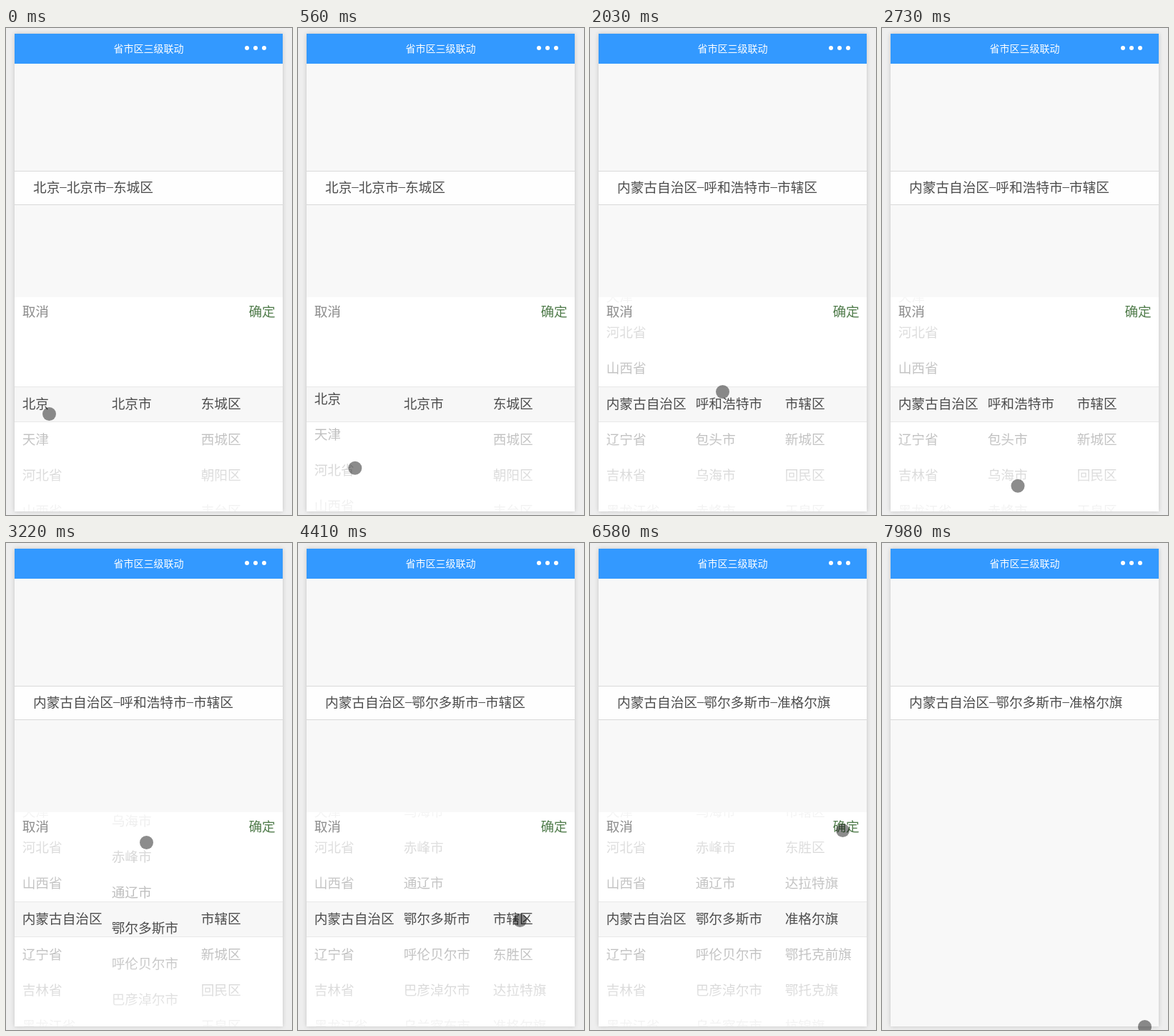
An HTML page for the animation above (8000 ms loop, 400 by 682 pixels).

```html
<!DOCTYPE html>
<html lang="zh-CN">
<head>
<meta charset="utf-8">
<style>
html, body { margin: 0; width: 100%; height: 100%; overflow: hidden; background: #eee; }
body { position: relative; font: 300 18.67px "Noto Sans CJK SC", "Noto Sans CJK", serif; color: #4c4c4c; }
div { position: absolute; box-sizing: border-box; }
#phone { left: 12px; top: 8px; width: 375px; height: 669px; background: #f8f8f8; box-shadow: 0 0 6px rgba(0,0,0,.18); }
#title { left: 0; top: 0; width: 375px; height: 42px; background: #39f; color: #fff; font-size: 14px; font-weight: 400; line-height: 40px; text-align: center; }
.dot { top: 17px; width: 6px; height: 6px; border-radius: 50%; background: #fff; }
#result { left: 0; top: 192px; width: 375px; height: 48px; padding-left: 26px; background: #fefefe; border: solid #d9d9d9; border-width: 1px 0; line-height: 42px; white-space: nowrap; }
#result i { position: relative; top: -2px; font: 1em "Liberation Serif", serif; }
#picker { left: 0; top: 369px; width: 375px; height: 300px; background: #fff; overflow: hidden; }
#band { left: 0; top: 125px; width: 375px; height: 50px; background: #f7f7f7; border: solid #e8e8e8; border-width: 1px 0; }
.col { top: 122.5px; line-height: 50px; white-space: pre; }
.mask { left: 0; top: 0; width: 375px; height: 125px; background: linear-gradient(rgba(255,255,255,.95), rgba(255,255,255,.6)); }
.mask.low { top: 175px; transform: scaleY(-1); }
.btn { top: 0; line-height: 38px; }
#cursor { left: -9.5px; top: -9.5px; width: 19px; height: 19px; border-radius: 50%; background: rgba(0,0,0,.45); }
</style>
</head>
<body>
<div id="phone">
  <div id="title">省市区三级联动</div>
  <div class="dot" style="left:322px"></div><div class="dot" style="left:334px"></div><div class="dot" style="left:346px"></div>
  <div id="result"></div>
  <div id="picker">
    <div id="band"></div>
    <div class="col" style="left:10.67px"></div>
    <div class="col" style="left:135.67px"></div>
    <div class="col" style="left:260.67px"></div>
    <div class="mask"></div><div class="mask low"></div>
    <div class="btn" style="left:10.67px;color:#8c8c8c">取消</div>
    <div class="btn" style="right:10.3px;color:#527d4d">确定</div>
  </div>
</div>
<div id="cursor"></div>
<script>
const LOOP = 8000, STEP = 70, HIDE = 6930;
const ROW = 50, SNAP = 350, SETTLE = 420;
const $ = id => document.getElementById(id);
const cols = document.querySelectorAll('.col');

// lists[column][number of picks made]; the last entry stays
const lists = [
  ['北京 天津 河北省 山西省 内蒙古自治区 辽宁省 吉林省 黑龙江省 上海'],
  ['北京市', '呼和浩特市 包头市 乌海市 赤峰市 通辽市 鄂尔多斯市 呼伦贝尔市 巴彦淖尔市 乌兰察布市 兴安盟'],
  ['东城区 西城区 朝阳区 丰台区', '市辖区 新城区 回民区 玉泉区',
   '市辖区 东胜区 达拉特旗 准格尔旗 鄂托克前旗 鄂托克旗 杭锦旗 乌审旗']
].map(column => column.map(s => s.split(' ')));

// cursor rests; one with a row ends a drag that began at the rest before it
const stop = (x, y, arrive, leave, row) => ({ x, y, arrive, leave, row });
const stops = [
  stop(60, 540, 0, 70),
  stop(78, 623, 490, 490),
  stop(115, 411, 1120, 1330, 4),
  stop(185, 509, 2030, 2450),
  stop(190, 656, 2800, 2800),
  stop(196, 419, 3220, 3220, 5),
  stop(310, 528, 3920, 4410),
  stop(303, 596, 4750, 4750),
  stop(296, 451, 5110, 5180, 3),
  stop(353, 402, 6580, 7490),
  stop(367, 677, 7980, LOOP)
];
const picks = stops.flatMap((end, i) => end.row ? [{ start: stops[i - 1], end }] : []);

const mix = (a, b, p) => a + (b - a) * p;
const ease = p => {
  p = Math.min(1, Math.max(0, p));
  return p * p * (3 - 2 * p);
};

function cursorAt(t) {
  const i = stops.findIndex(s => t <= s.leave);
  const to = stops[i], from = stops[i - 1] || to;
  const p = ease((t - from.leave) / (to.arrive - from.leave || 1));
  const bow = i === stops.length - 1 ? 31 * Math.sin(Math.PI * p) : 0;
  return { x: mix(from.x, to.x, p) + bow, y: mix(from.y, to.y, p) };
}

function scrollAt({ start, end }, t) {
  if (t < start.leave) return 0;
  const dragged = start.y - cursorAt(Math.min(t, end.leave)).y;
  return mix(dragged, end.row * ROW, ease((t - end.leave) / SNAP));
}

let shown;
function show(done) {
  if (done === shown) return;
  shown = done;
  const now = lists.map(column => column[Math.min(done, column.length - 1)]);
  now.forEach((names, i) => cols[i].textContent = names.join('\n'));
  $('result').innerHTML = now.map((names, i) => names[i < done ? picks[i].end.row : 0]).join('<i>–</i>');
}

function frame(time) {
  const t = Math.floor(time % LOOP / STEP) * STEP;
  show(picks.filter(p => t >= p.end.leave + SETTLE).length);
  cols.forEach((c, i) => c.style.transform = `translateY(${-scrollAt(picks[i], t)}px)`);
  $('picker').style.display = t < HIDE ? '' : 'none';
  const { x, y } = cursorAt(t);
  $('cursor').style.transform = `translate(${x}px,${y}px)`;
  requestAnimationFrame(frame);
}
requestAnimationFrame(frame);
</script>
</body>
</html>
```
